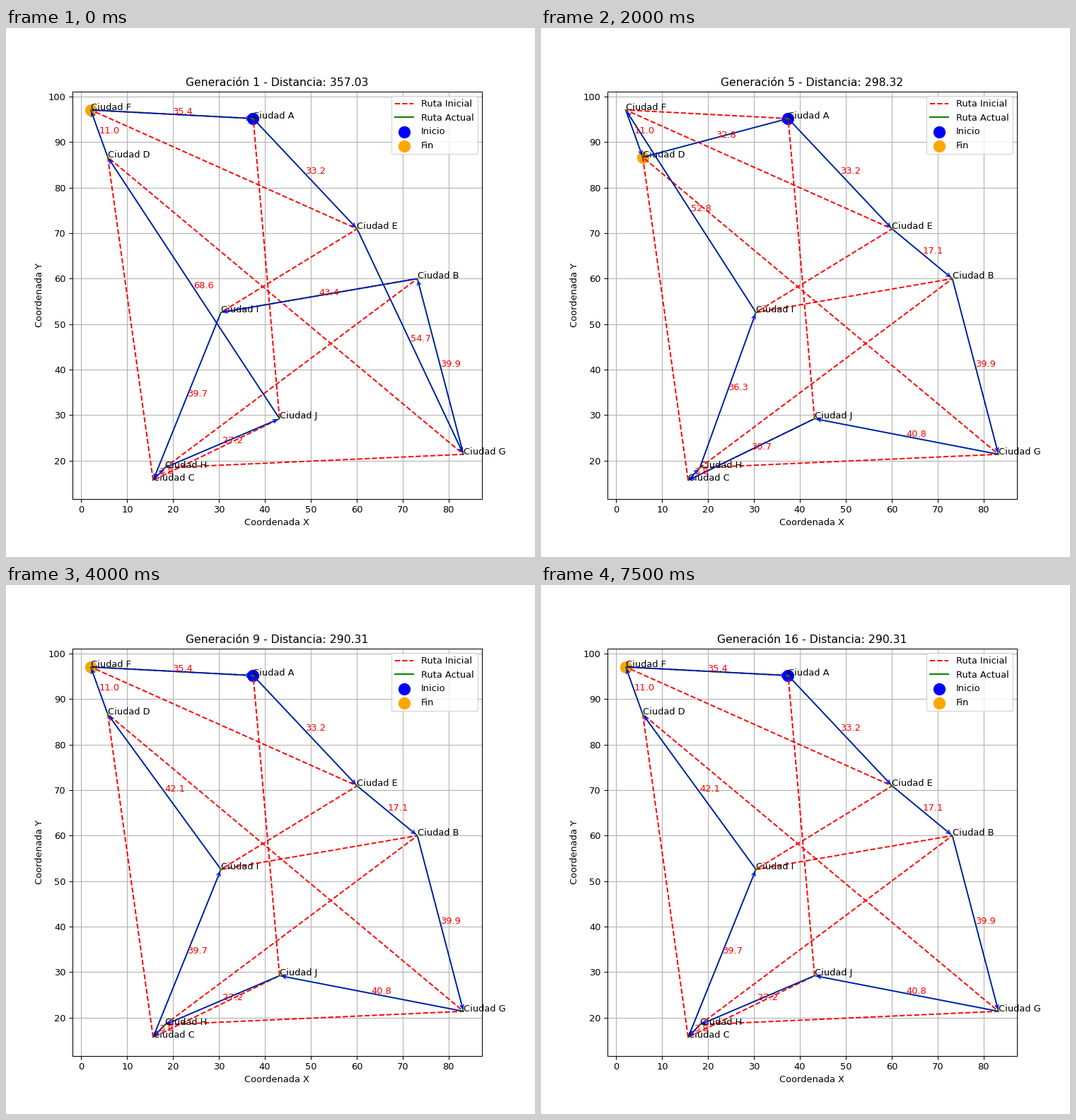
Animation of 748 by 748 pixels, one loop 8000 ms. Source, as a matplotlib script:

```python
import numpy as np
import matplotlib.pyplot as plt
from matplotlib.animation import FuncAnimation

CITIES = {
    "A": (37.44, 95.17), "B": (73.22, 59.98), "C": (15.65, 15.66),
    "D": (5.76, 86.68), "E": (60.09, 70.92), "F": (2.06, 97.05),
    "G": (83.26, 21.37), "H": (18.20, 18.43), "I": (30.42, 52.56),
    "J": (43.19, 29.20),
}
INITIAL = "AFEIBHGDCJ"

# first generation, best tour, tour length
BEST = [
    (1, "AEGBICHJDF", 357.03),
    (2, "AEBJGIHCDF", 353.60),
    (3, "AEBGJCHIFD", 298.32),
    (6, "AEBGJCHIDF", 290.32),
    (9, "AEBGJHCIDF", 290.31),
]
GENERATIONS = 16

plt.rcParams["font.family"] = "DejaVu Sans"
fig, ax = plt.subplots(figsize=(8, 8), dpi=93.5)


def closed(tour):
    return np.array([CITIES[c] for c in tour + tour[0]])


def draw_leg(p, q):
    ax.annotate("", xy=q, xytext=p,
                arrowprops=dict(arrowstyle="->", color="blue"))
    mid = (p + q) / 2
    ax.text(*mid, f"{np.hypot(*(q - p)):.1f}", color="red", fontsize=10)


def update(i):
    gen = i + 1
    _, tour, length = [b for b in BEST if b[0] <= gen][-1]
    path = closed(tour)

    ax.clear()
    ax.plot(*closed(INITIAL).T, "r--", label="Ruta Inicial")
    ax.plot(*path.T, "g-", label="Ruta Actual")
    ax.scatter(*path[0], color="blue", s=150, label="Inicio")
    ax.scatter(*path[-2], color="orange", s=150, label="Fin")
    for name, pos in CITIES.items():
        ax.text(*pos, f"Ciudad {name}", fontsize=10)
    for p, q in zip(path, path[1:]):
        draw_leg(p, q)

    ax.set_title(f"Generación {gen} - Distancia: {length:.2f}")
    ax.set_xlabel("Coordenada X")
    ax.set_ylabel("Coordenada Y")
    ax.legend(loc="upper right")
    ax.grid(True)
    return []


anim = FuncAnimation(fig, update, frames=GENERATIONS, interval=500,
                     init_func=lambda: [], repeat=True, repeat_delay=0)
plt.show()
```
